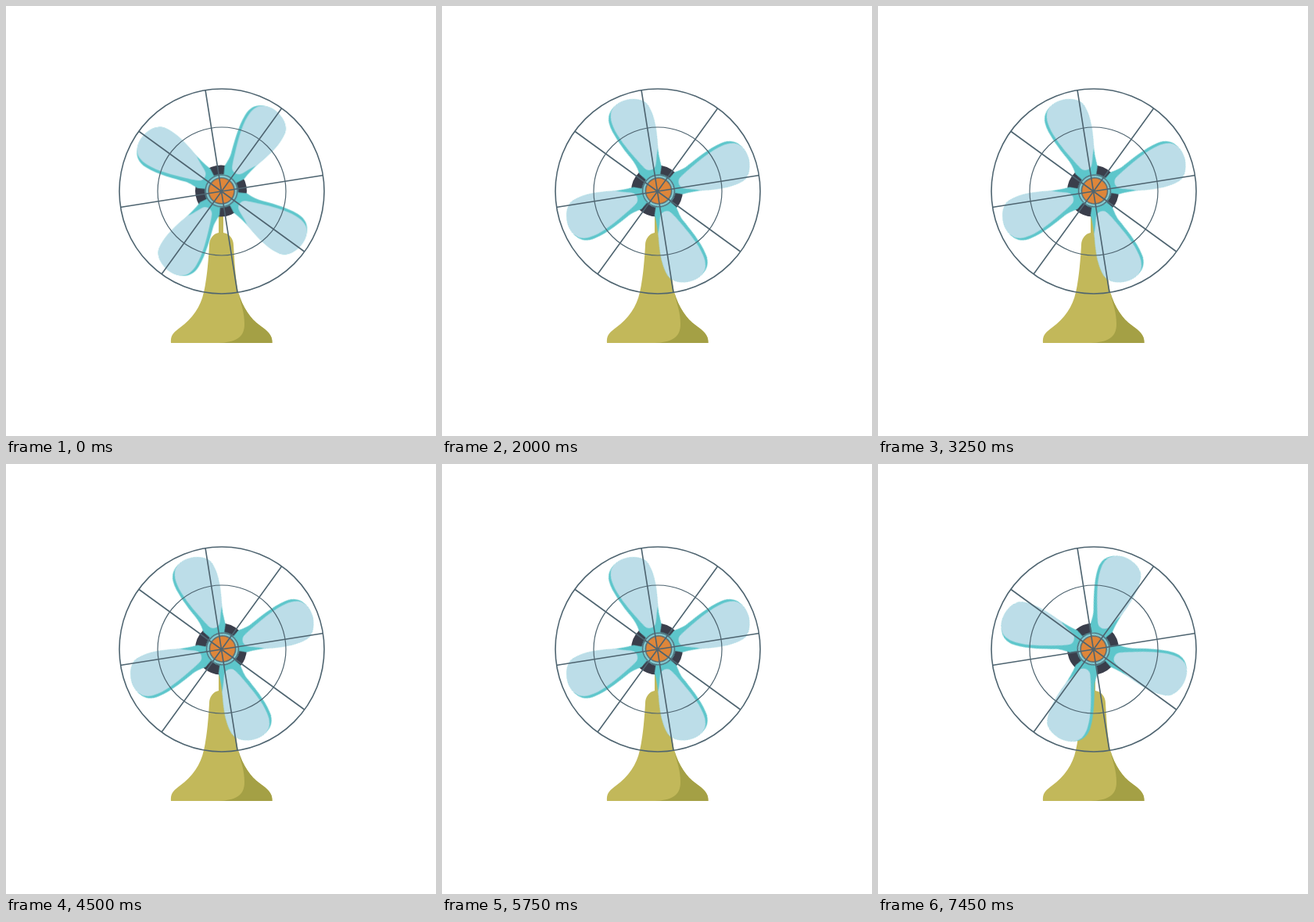
Recreate the animation shown at these times as an HTML page. Size 550 by 550 pixels, loop 7500 ms.

```html
<!DOCTYPE html>
<html lang="en">
<head>
<meta charset="utf-8">
<title>Desk fan</title>
<style>
  html, body { margin: 0; width: 100%; height: 100%; overflow: hidden; background: #fff; }
  svg { display: block; width: 100vw; height: 100vh; }
  .rotor { animation: spin 1250ms steps(25, end) infinite; }
  @keyframes spin { to { transform: rotate(360deg); } }
  .cage { fill: none; stroke: #4e6470; stroke-width: 1.6; }
</style>
</head>
<body>
<svg viewBox="0 0 550 550">
  <defs>
    <g id="blade">
      <path fill="#5dc6cb" d="M-7-10 L-10-19 L-15-28 C-15-36 -15.5-41 -17-46 C-21-58 -29-80 -29.6-97 C-30-109 -25-116 -16-120 C-10-123 -2-124 6-122 C15-120 24-114 25.5-106 C28-92 26-78 20-57 C17.500-47 15.500-38 15-28 L10-19 L7-10Z"/>
      <path fill="#bcdde8" d="M-14-120.800 C-24-117 -26.500-108 -26-97 C-25.500-82 -18-62 -13.500-50 C-10.500-42 -8.500-37 -6-32 C-3.500-27.500 3-26.500 7-30 C10.500-33.500 12-41 18.800-52 L20-57 C26-78 28-92 25.500-106 C24-114 15-120 6-122 C-2-124 -9-123 -14-120.800Z"/>
    </g>
  </defs>

  <!-- stand -->
  <path fill="#c2b85a" d="M272 260 H278 V290 C286 291 291 298 291 306 C292 322 293 345 297 366 C303 386 313 400 324 408 C335 416 341 421 340.500 431 H211 C210 421 215 417 223 411 C238 400 249 385 253 366 C257 349 259 325 260 306 C260 298 265 291 272 290Z"/>
  <path fill="#a4a045" d="M297 366 C303 386 313 400 324 408 C335 416 341 421 340.500 431 H272 C294 430 305 424 305 407 C305 391 301 384 297 366Z"/>

  <circle cx="275" cy="236.500" r="33" fill="#3a3e4b"/>

  <g transform="translate(276.300 236.200)">
    <g class="rotor">
      <use href="#blade" transform="rotate(34)"/>
      <use href="#blade" transform="rotate(124)"/>
      <use href="#blade" transform="rotate(214)"/>
      <use href="#blade" transform="rotate(304)"/>
      <g transform="translate(-.7 .2)" stroke="#4e6470" stroke-width="1.400">
        <circle r="21.500" fill="#5dc6cb" stroke="none"/>
        <circle r="20.300" fill="#85d0d6"/>
        <circle r="16.600" fill="#de863a"/>
      </g>
    </g>
  </g>

  <g class="cage">
    <circle cx="276" cy="237" r="131"/>
    <circle cx="276" cy="237" r="82" stroke-width="1.200"/>
    <path d="M255 107.500 L296 366.500 M352.500 131 L199 343 M146 257.500 L406 216.500 M169.500 160 L381.500 314"/>
  </g>
</svg>
</body>
</html>
```
